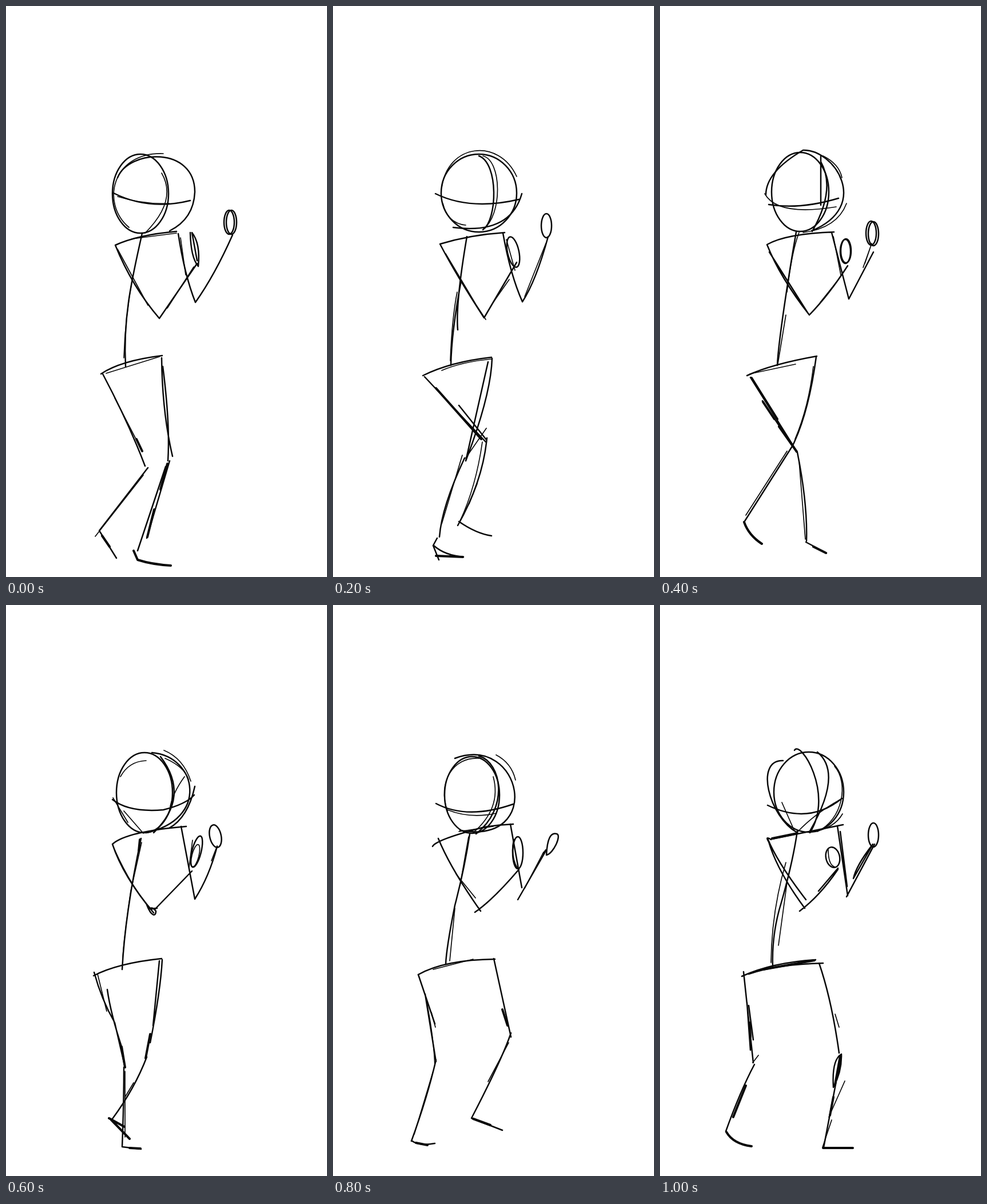
An HTML page without scripts for the animation above (1200 ms loop, 561x998 px).

```html
<!DOCTYPE html>
<html lang="en">
<head>
<meta charset="utf-8">
<title>Walk cycle sketch</title>
<style>
  html, body { margin: 0; width: 100%; height: 100%; overflow: hidden; background: #fff; }
  svg { display: block; width: 100%; height: 100%; overflow: hidden; }
  #strip {
    fill: none; stroke: #080808; stroke-width: 2.5;
    stroke-linecap: round; stroke-linejoin: round;
    animation: walk 1.2s steps(6) infinite;
  }
  .t { stroke-width: 1.7; }
  .b { stroke-width: 4; }
  .fist { rx: 9px; ry: 21px; }
  .tilt { transform-box: fill-box; transform-origin: center; transform: rotate(-12deg); }
  .lean { transform-box: fill-box; transform-origin: center; transform: rotate(14deg); }
  /* six poses side by side, one stage width apart */
  @keyframes walk { to { transform: translateX(-3366px); } }
</style>
</head>
<body>
<svg viewBox="0 0 561 998">
<g id="strip">

<g>
  <ellipse cx="235" cy="328" rx="49" ry="69"/>
  <path d="M195 300C215 250 330 245 330 325Q328 372 286 393M188 327Q250 358 322 340"/>
  <path class="t" d="M215 387C165 345 185 255 275 258M272 292Q300 340 243 397M195 333Q240 347 285 345"/>
  <path d="M298 394Q230 400 191 418Q220 490 268 546L334 450M301 398Q312 470 331 518Q365 470 396 400"/>
  <path class="t" d="M220 407L298 397M195 425L248 523M282 528L328 456M305 405L314 470"/>
  <path d="M322 396Q323 440 336 455Q340 415 325 396L334 445"/>
  <ellipse class="fist" cx="390" cy="378"/><ellipse class="fist" cx="394" cy="378"/>
  <path d="M238 397C222 470 204 540 209 630M166 643Q200 620 273 611"/>
  <path class="t" d="M222 470Q208 545 206 615M175 642L268 613"/>
  <path d="M169 643Q215 730 243 804M272 615Q273 710 291 787M274 630Q287 730 283 795M248 807L163 917L193 965M286 795L246 930M279 805L230 952"/>
  <path class="t" d="M190 685L238 778M240 820L156 927"/>
  <path class="b" d="M228 757L238 778M168 926L181 945M282 800L270 845M259 880L247 928M223 952L230 968Q255 976 288 978"/>
</g>

<g transform="translate(561)">
  <ellipse cx="255" cy="327" rx="66" ry="68"/>
  <path d="M255 262C290 275 287 375 262 391M179 328Q240 358 325 338M330 328Q310 400 210 387"/>
  <path class="t" d="M262 262C295 270 297 365 262 391M190 318C200 240 290 230 321 298M192 345Q200 380 232 383"/>
  <path d="M300 396Q240 400 187 416Q215 470 264 545L321 448M297 397Q310 470 331 517Q355 480 376 403"/>
  <path class="t" d="M197 433L250 522L267 548M280 518L308 478M303 408L318 462M335 508L372 415"/>
  <ellipse class="tilt" cx="315" cy="430" rx="10" ry="27"/>
  <ellipse class="fist" cx="373" cy="384"/>
  <path d="M234 403Q214 520 218 566M224 480Q207 570 206 628M157 646Q205 622 277 614"/>
  <path class="t" d="M217 500Q208 545 205 620M190 637Q225 622 277 617"/>
  <path d="M160 648L268 763M220 698L268 758M278 616Q276 680 232 795L271 622M269 755Q262 830 218 908M230 790Q190 875 186 928M220 901Q250 922 277 926M182 930L175 943L185 968M176 943Q195 960 228 963"/>
  <path class="t" d="M268 738L232 790M261 762Q250 840 222 900M252 835L238 870M226 785L190 905"/>
  <path class="b" d="M180 668L259 757M180 961L227 963"/>
</g>

<g transform="translate(1122)">
  <ellipse cx="245" cy="325" rx="50" ry="69"/>
  <path d="M185 330Q185 290 250 252C305 250 370 350 265 393M281 262V348M281 272Q308 320 266 394M190 347Q245 356 312 336"/>
  <path class="t" d="M183 328Q205 368 308 351M326 345Q310 388 250 396M285 262Q313 276 318 300"/>
  <path d="M304 395Q220 398 187 417Q210 475 261 540Q295 505 328 454M191 430L258 536M300 396L330 512L373 430"/>
  <path class="t" d="M280 518L308 483M303 403L316 470M355 457L370 415L358 450"/>
  <ellipse class="fist" cx="324" cy="429"/><ellipse class="fist" cx="325" cy="428"/>
  <ellipse class="fist" cx="373" cy="398"/><ellipse class="fist" cx="369" cy="397"/>
  <path d="M238 395C225 470 207 585 205 628M152 646Q195 626 274 612"/>
  <path class="t" d="M243 396Q230 430 222 500M220 540L206 625M157 643L237 626"/>
  <path d="M158 649L240 780M179 690L238 778M273 613Q260 710 232 768L147 902M240 780Q258 870 256 935M255 937L291 956"/>
  <path class="t" d="M268 630Q260 700 236 757M222 778L150 890M243 795L254 932"/>
  <path class="b" d="M160 650L205 722M180 692L200 722M208 735L239 779M147 902Q155 925 178 940M268 945L290 956"/>
</g>

<g transform="translate(1683)">
  <ellipse cx="242" cy="328" rx="49" ry="70"/>
  <path d="M255 258C335 265 355 375 245 398M270 265Q323 335 258 398M186 340Q215 363 275 358Q315 348 329 332M330 317Q318 372 285 390"/>
  <path class="t" d="M276 254Q310 268 323 308M245 272Q215 273 200 300M278 268Q312 283 319 305M312 300Q290 330 286 358M187 337L213 380M206 360L240 399"/>
  <path d="M315 387Q210 396 186 418Q205 475 258 538M260 532L325 465M306 387L330 514Q355 475 369 422"/>
  <path class="t" d="M190 428Q220 495 255 533M359 447L369 421M326 411L320 458"/>
  <path d="M246 524C254 545 262 545 262 535Q256 527 250 531L264 530"/>
  <ellipse class="lean" cx="333" cy="431" rx="8" ry="28"/>
  <ellipse class="lean t" cx="331" cy="438" rx="6" ry="20"/>
  <ellipse class="tilt" cx="366" cy="404" rx="10" ry="20"/>
  <path d="M236 408Q208 540 203 637M153 648Q195 626 272 618"/>
  <path class="t" d="M237 415L218 500Q205 590 204 620"/>
  <path d="M154 642Q167 690 190 730L208 808M177 672Q183 715 203 775M273 620Q270 675 252 765M268 622L257 735M246 790Q225 845 186 898"/>
  <path d="M206 808Q206 870 203 947L236 951"/>
  <path class="t" d="M160 645L176 710M223 835L208 860M208 815V930"/>
  <path class="b" d="M202 772L208 808M234 410L232 430M252 750L244 792M180 897L207 912M184 900L216 933M216 949L235 950"/>
</g>

<g transform="translate(2244)">
  <ellipse cx="243" cy="332" rx="48" ry="67"/>
  <path d="M213 268C330 225 370 420 222 394M255 264C295 275 308 355 250 400M180 347Q235 376 315 348"/>
  <path class="t" d="M200 360C182 310 210 265 255 268M280 300Q295 355 245 398M200 358Q240 374 285 364M285 262Q312 276 319 306"/>
  <path d="M174 422Q180 410 265 388Q290 384 315 383M184 408Q205 460 258 535M248 537Q280 515 325 462M310 383L330 494M323 515L373 428"/>
  <path class="t" d="M215 470L249 512M335 495L368 432M220 396L280 387"/>
  <ellipse cx="323" cy="433" rx="9" ry="28"/>
  <path d="M316 410Q310 440 322 460M373 437C385 435 400 402 391 400Q375 395 373 437M367 435L372 428"/>
  <path d="M239 400Q230 460 213 525Q198 600 197 628M149 646Q195 620 283 619"/>
  <path class="t" d="M237 405L222 490M213 530L204 622M175 637L245 619"/>
  <path d="M149 646L178 732M161 680L180 798M281 618L311 755M180 795Q165 860 137 937M311 748Q295 795 242 897L296 918M137 936Q150 946 178 941"/>
  <path class="t" d="M163 690Q176 755 178 805M175 815L142 925M307 765L271 833M172 712L179 738"/>
  <path class="b" d="M145 940L165 944M245 898L275 909M296 707L305 735"/>
</g>

<g transform="translate(2805)">
  <ellipse cx="260" cy="327" rx="61" ry="70"/>
  <path d="M235 254C245 235 305 330 262 398M215 272C165 270 190 370 240 398M188 350Q260 385 318 338M275 257C315 290 285 355 262 395"/>
  <path class="t" d="M240 397Q270 365 315 340M305 282C330 310 320 375 275 396M213 345L235 395M319 365Q305 390 268 396"/>
  <path d="M196 409L320 384M188 408Q205 450 255 515M253 530Q205 465 190 414Q183 403 194 410M244 535Q280 508 311 462M277 500L311 460"/>
  <path d="M310 386L328 508M315 396L327 492M326 510L375 418M338 478Q343 455 372 418L338 478"/>
  <ellipse class="tilt" cx="302" cy="441" rx="12" ry="18"/>
  <path class="t" d="M294 427Q294 455 306 458"/>
  <ellipse class="fist" cx="373" cy="402"/>
  <path d="M240 395Q232 450 212 520Q195 575 197 632M143 649Q195 625 272 620M155 645Q205 628 285 626"/>
  <path class="t" d="M220 450Q195 535 194 625M222 485L207 595"/>
  <path d="M146 641L163 800M152 695L158 778M155 700L163 760M278 626Q300 690 313 783M165 803Q140 850 115 920M317 785L286 948M317 785Q300 795 303 843Q318 815 317 785"/>
  <path class="t" d="M172 787L162 800M323 832L295 895M300 900L284 948M306 715L313 738"/>
  <path class="b" d="M196 408L240 399M180 637L270 621M157 730L158 755M150 840L128 895M315 788L306 838M303 860L297 892M116 921Q128 942 160 946M285 949H337"/>
</g>

</g>
</svg>
</body>
</html>
```
